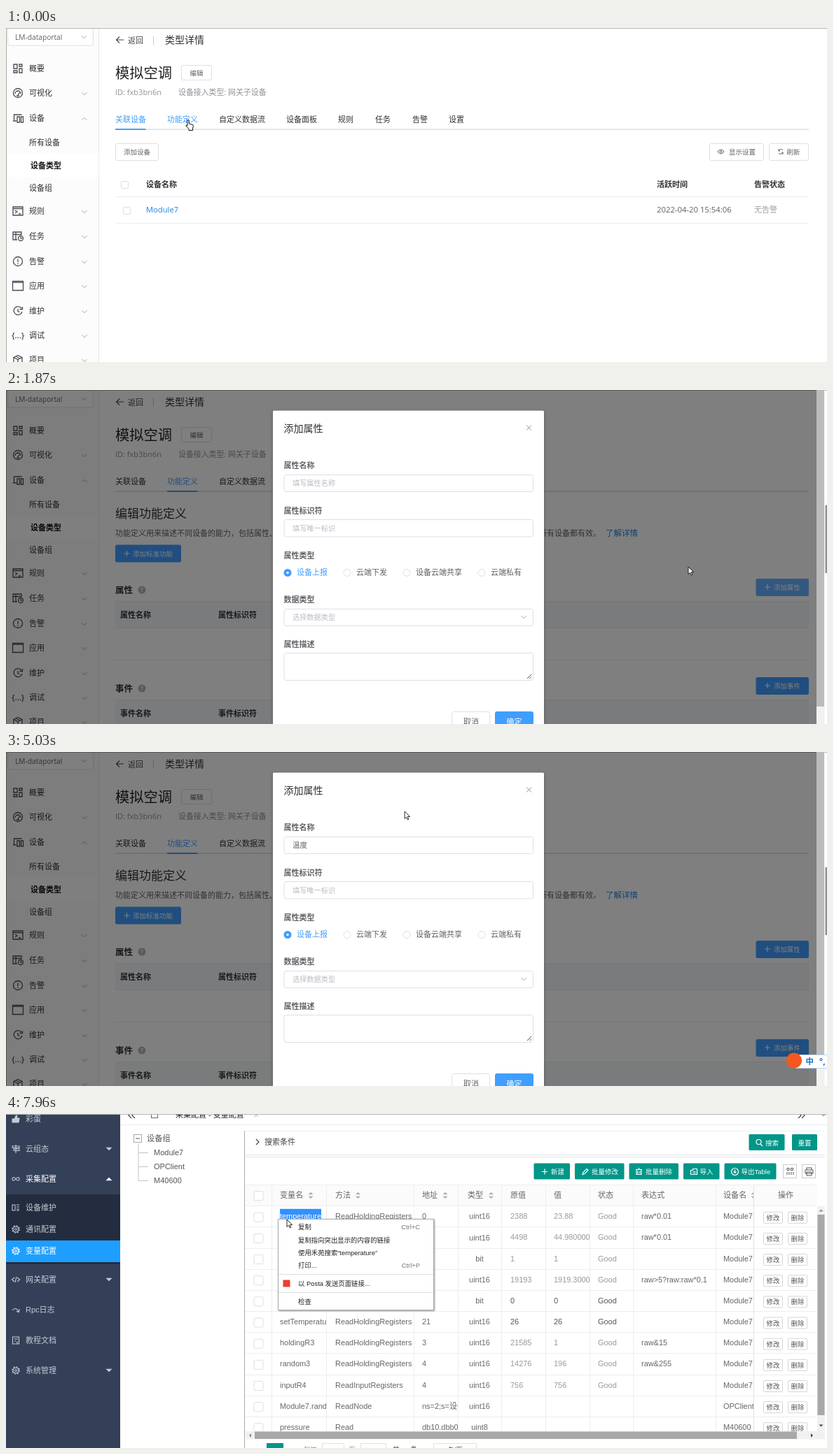
An HTML page for the animation above (8000 ms loop, 1172 px wide and 478 px high).

```html
<!DOCTYPE html>
<html lang="zh-CN">
<head>
<meta charset="utf-8">
<style>
html, body { margin: 0; width: 100%; height: 100%; overflow: hidden; background: #fff; }
svg { display: block; }
text { white-space: pre; }
#stage { width: 1172px; height: 478px; font-family: 'Open Sans', 'Noto Sans CJK SC', 'Noto Sans CJK', sans-serif; }
#monitor { font-family: 'Liberation Sans', 'Noto Sans CJK SC', 'Noto Sans CJK', sans-serif; }
</style>
</head>
<body>
<svg id="stage" viewBox="0 0 1172 478"></svg>
<script>
const LOOP = 8000;
const BLUE = '#409eff', GREEN = '#009688';
const $ = id => document.getElementById(id);

// ---- drawing helpers: each returns SVG markup ----
const esc = s => String(s).replace(/&/g, '&amp;').replace(/</g, '&lt;');
const text = (x, y, s, size = 11, fill = '#303133', more = '') =>
  `<text x="${x}" y="${y + size * 0.37}" font-size="${size}" fill="${fill}" ${more}>${esc(s)}</text>`;
const bold = (x, y, s, size, fill) => text(x, y, s, size, fill, 'font-weight="700"');
const rect = (x, y, w, h, fill, stroke = 'none', r = 0, more = '') =>
  `<rect x="${x}" y="${y}" width="${w}" height="${h}" fill="${fill}" stroke="${stroke}" rx="${r}" ${more}/>`;
const path = (d, stroke, w = 1, fill = 'none') =>
  `<path d="${d}" stroke="${stroke}" stroke-width="${w}" fill="${fill}"/>`;
const disc = (x, y, r, fill, stroke = 'none', w = 1) =>
  `<circle cx="${x}" cy="${y}" r="${r}" fill="${fill}" stroke="${stroke}" stroke-width="${w}"/>`;
const hline = (x1, x2, y, c = '#ebeef5') => path(`M${x1} ${y + .5}H${x2}`, c);
const vline = (x, y1, y2, c = '#eee') => path(`M${x + .5} ${y1}V${y2}`, c);
const at = (x, y, s) => `<g transform="translate(${x} ${y})">${s}</g>`;
const group = (id, s) => `<g id="${id}">${s}</g>`;
const clip = (x, y, w, h, s) => `<svg x="${x}" y="${y}" width="${w}" height="${h}">${s}</svg>`;
const chevron = (x, y, dir = 1, c = '#a0a4aa') =>
  path(`M${x - 3.5} ${y - 1.8 * dir}l3.5 3.5 3.5 -3.5`.replace(/3\.5 3\.5 3\.5 -3\.5/, `3.5 ${3.5 * dir} 3.5 ${-3.5 * dir}`), c);
const plus = (x, y) => path(`M${x - 4} ${y}h8M${x} ${y - 4}v8`, '#fff', 1.1);
const box = (x, y, w, h, label, tx) =>
  rect(x + .5, y + .5, w, h, '#fff', '#dcdfe6', 2.5) + text(tx, y + h / 2 + .5, label, 9.5, '#606266');

// ---- first screen: device type page ----
const icons = [
  [58, 'M-6 -6h5v6h-5zM2 -6h4v3h-4zM2 0h4v6h-4zM-6 3h5v3h-5z'],
  [93, 'M-6.5 0a6.5 6.5 0 1 0 13 0a6.5 6.5 0 1 0 -13 0M-4 1a4 4 0 0 1 8 0M0 3l2.5 -4M-2 4h4'],
  [129, 'M-2 4h-5M-5.5 3v-8h11M-1 -2h3.5v8h-3.5zM4.5 -2h3v8h-3z'],
  [262, 'M-7 -6h14v12h-14zM-7 -3.5h14M-4 -1l3 2 -3 2M1 4h3'],
  [298, 'M-1 5h-6v-11h12v4M-7 -2.5h12M-3 -6v11M0.5 3a3.5 3.5 0 1 0 7 0a3.5 3.5 0 1 0 -7 0M4 1v2h2'],
  [334, 'M-6.5 0a6.5 6.5 0 1 0 13 0a6.5 6.5 0 1 0 -13 0M0 -3.5v4.5M0 2.5v1.5'],
  [369, 'M-7.5 -6.5h15v13h-15zM-7.5 -4.8h15'],
  [405, 'M5 -4a6 6 0 1 0 1 5M6.5 -6v3.5h-4M0 -3v3.5l2.5 1'],
  [475, 'M0 -6.5l6 3v7l-6 3 -6 -3v-7zM-6 -3.5l6 3 6 -3M0 -.5v7M-3 -5l6 3']
];
const menu = [['概要', 58], ['可视化', 93], ['设备', 129], ['规则', 262], ['任务', 298],
  ['告警', 334], ['应用', 369], ['维护', 405], ['调试', 440], ['项目', 475]];

const sidebar = rect(0, 0, 132, 478, '#fcfcfc') + rect(1, 180, 131, 33, '#fff') + vline(132, 0, 478, '#e6e8eb') +
  rect(2.5, -4.5, 122, 29.5, '#fff', '#dcdfe6', 3) + text(13, 13, 'LM-dataportal', 10.2, '#606266') + chevron(111, 13) +
  icons.map(([y, d]) => at(17, y, path(d, '#4a4d52', 1.3))).join('') +
  text(8, 440, '{...}', 11.5, '#4a4d52', 'font-weight="600"') +
  menu.map(([s, y], i) => text(33, y, s) + (i ? chevron(112, y + 1, i === 2 ? -1 : 1) : '')).join('') +
  text(33, 164, '所有设备') + bold(35, 197, '设备类型', 11, '#111') + text(33, 229, '设备组');

const header = path('M168 17h-10M162 12.5l-4.5 4.5 4.5 4.5', '#444', 1.1) + text(174, 17.5, '返回', 11, '#444') +
  vline(210, 11, 24, '#ccc') + text(227, 17, '类型详情', 14) + text(156, 64, '模拟空调', 20.3, '#1f2022') +
  box(250, 53, 43, 21, '编辑', 262.5) + text(156, 92, 'ID: fxb3bn6n', 11, '#909399') +
  text(246, 92, '设备接入类型: 网关子设备', 10.9, '#909399');

const tabs = lit => hline(156, 1146, 145, '#dfe2e8') + hline(156, 1146, 144, '#e6e9ee') +
  [['关联设备', 156], ['功能定义', 230], ['自定义数据流', 304], ['设备面板', 400], ['规则', 474],
   ['任务', 527], ['告警', 580], ['设置', 632]]
    .map(([s, x], i) => text(x, 131, s, 11, lit.includes(i) ? BLUE : '#303133')).join('');

const check = (x, y, s = 10) => rect(x - s / 2 + .5, y - s / 2 + .5, s, s, '#fff', '#dcdfe6', 1.5);

const devices = tabs([0, 1]) + box(156, 165, 61, 24, '添加设备', 168) + box(1004, 165, 77, 24, '显示设置', 1032) +
  path('M1016 177q4.5 -6 9 0q-4.5 6 -9 0', '#606266') + disc(1020.5, 177, 1.4, 'none', '#606266') +
  box(1089, 165, 56, 24, '刷新', 1114.5) + path('M1103 176a3.4 3.4 0 0 1 6 -1M1109 178a3.4 3.4 0 0 1 -6 1M1103 173v3h2M1109 181v-3h-2', '#606266') +
  check(169, 224) + bold(200, 224, '设备名称') + bold(929, 224, '活跃时间') + bold(1068, 224, '告警状态') + hline(156, 1146, 241) +
  check(172, 261) + text(200, 260, 'Module7', 11.2, '#1d84e2') + text(929, 260, '2022-04-20 15:54:06', 11.3, '#606266') +
  text(1068, 260, '无告警', 11, '#a0a0a0') + hline(156, 1146, 279);

const block = (y, name, id) => bold(156, y, name, 12.5) + disc(194, y, 5.5, '#b4b6ba') +
  text(194, y, '?', 8, '#fff', 'text-anchor="middle" font-weight="700"') +
  rect(1070.5, y - 16, 75.5, 25, BLUE, 'none', 2.5, `id="${id}"`) + plus(1087, y - 4) + text(1096, y - 3.5, '添加' + name, 9.4, '#fff') +
  rect(156, y + 16, 990, 38, '#f5f7fa') + hline(156, 1146, y + 16) + hline(156, 1146, y + 54) +
  ['名称', '标识符', '类型'].map((s, i) => bold(163 + i * 140, y + 36, name + s)).join('');

const functions = tabs([1]) + text(156, 177, '编辑功能定义', 17) +
  text(156, 205, '功能定义用来描述不同设备的能力，包括属性、事件和服务三种功能类型，设备类型的功能定义完成后，将对该设备类型下的所有设备都有效。', 11, '#606266') +
  text(856, 205, '了解详情', 11.5, '#1d84e2') +
  rect(156, 221.5, 94, 25, BLUE, 'none', 2.5) + plus(172.5, 234) + text(181, 234, '添加标准功能', 9.5, '#fff') +
  block(286, '属性', 'addProp') + bold(583, 322, '数据类型') +
  text(651, 363, '暂无数据', 11, '#909399', 'text-anchor="middle"') + hline(156, 1146, 386) + block(427, '事件', 'addEvent') +
  rect(1169.5, 165, 3, 97, '#8d9095');

// ---- dialog ----
const field = (y, h, more = '') => rect(397, y + .5, 355.5, h, '#fff', '#dcdfe6', 3, more);
const hint = (y, s, more) => text(409, y, s, 10.2, '#b8bcc4', more);
const dialog = rect(381, 29.5, 387, 470, '#fff', 'none', 1.5, 'style="filter:drop-shadow(0 1px 2px rgba(0,0,0,.3))"') +
  text(396.5, 55, '添加属性', 14) + path('M743 50.500l7 7M750 50.500l-7 7', '#909399') +
  [['属性名称', 108], ['属性标识符', 172.5], ['属性类型', 237], ['数据类型', 300], ['属性描述', 364]]
    .map(([s, y]) => bold(396.5, y, s, 11, '#606266')).join('') +
  field(121, 24, 'id="nameBox"') + hint(133, '填写属性名称', 'id="nameHint"') + text(409, 133, '', 10.5, '#606266', 'id="nameText"') +
  field(185, 24.5) + hint(198, '填写唯一标识') + field(313, 24) + hint(325, '选择数据类型') + chevron(739, 325) +
  field(376, 39) + path('M744 413l6 -6M747.5 413l2.500 -2.500', '#555') +
  [['设备上报', 402], ['云端下发', 487], ['设备云端共享', 572], ['云端私有', 679]].map(([s, x], i) =>
    disc(x, 261.5, i ? 5 : 5.5, i ? '#fff' : BLUE, i ? '#dcdfe6' : 'none') + (i ? '' : disc(x, 261.5, 1.7, '#fff')) +
    text(x + 13, 261, s, 11, i ? '#606266' : BLUE)).join('') +
  rect(636.5, 460.5, 54, 28, '#fff', '#dcdfe6', 3) + text(653, 475, '取消', 11, '#606266') +
  rect(698, 460, 55, 28, BLUE, 'none', 3) + text(714.5, 475, '确定', 11, '#fff');

const scrollbar = rect(1157, 0, 11.5, 478, '#f1f1f1') + rect(1157, 0, 11, 453, '#bcbcbc');

const suggestions = rect(397, 154.5, 355, 206, '#fff', '#e4e7ed', 3, 'style="filter:drop-shadow(0 1px 4px rgba(0,0,0,.16))"') +
  clip(397, 155, 355, 204, [['电压', 'U'], ['电流', 'I'], ['瞬时总有功功率', 'P'], ['瞬时总无功功率', 'Q'], ['瞬时总视在功率', 'S']]
    .map(([s, k], i) => text(15.5, 21 + 45.6 * i, s, 11, '#606266') + text(15.5, 38.5 + 45.6 * i, k, 9.5, '#909399') +
      text(339, 21 + 45.6 * i, '智能单相电表', 9.4, '#a0a2a6', 'text-anchor="end"')).join(''));

const imeBar = rect(1126.5, 433.5, 60, 19, '#fff', '#b9d4ec', 2) + disc(1125, 441.5, 11, '#f4581f') +
  bold(1141.5, 443, '中', 11.5, '#1570d8') + bold(1161, 443, '°,', 12, '#1570d8');

const words = { w: '我 为 无 万 位', we: '我 为 未 位 问', wen: '问 文 稳 吻 Welka', wend: '温度 问的 稳定 文档', wendu: '温度 稳度 温' };
function candidates(key) {
  let x = 419, s = rect(409.5, 140.5, 246.5, 42, '#fff', '#7fb2de', 1) + disc(647, 151, 8, '#fbd9c8');
  s += text(418, 150, key, 12.5, '#0a6cd6');
  words[key].split(' ').forEach((w, i) => {
    const c = i ? '#0a6cd6' : '#e8402a', latin = /\w/.test(w);
    s += text(x, 169.5, i + 1, 9.5, c) + text(x + 8.5, 169.5, w, 13.2, c);
    x += 20 + (latin ? 44 : 13.2 * w.length);
  });
  return s + path('M623 168l-2.500 3 2.500 3', '#bbb') + path('M632 168l3 3 -3 3', '#0a6cd6', 1.3);
}

const page = rect(0, 0, 1172, 478, '#fff') + sidebar + header + group('devices', devices) + group('functions', functions) +
  rect(156, 144, 43.5, 2, BLUE, 'none', 0, 'id="tabBar"') + hline(0, 1172, 0, '#b5b5b5') + vline(0, 0, 478, '#a5a5a5') +
  rect(0, 0, 1157, 478, '#000', 'none', 0, 'id="mask"') + group('dialog', scrollbar + dialog) + group('suggestions', suggestions) +
  group('imeBar', imeBar) + group('candidates', '') + group('caret', rect(0, 0, 1, 11, '#333'));

// ---- second screen: variable table ----
const NAV = '#c5cad3';
const navIcons = [
  [7, 'M-5 0h2.500v5h-2.500zM-2 0l2.500 -5q2 0 1 4h3.500l-1 6h-6z', 1], [50, 'M-5 -4h10v2.500h-10zM-3 0h8v2.500h-8zM0 -6v12'],
  [93, 'M0 0c-2 -3 -5 -3 -5 0s3 3 5 0s5 -3 5 0s-3 3 -5 0'], [134, 'M-5 -4h4v8h-4zM1 -4h4M1 -1h4M1 2h4M1 4h4'],
  [237, 'M-2 -3l-3.500 3 3.500 3M2 -3l3.500 3 -3.500 3M1 -4l-2 8'], [280, 'M-5 1q5 -6 9 2M5 -1l-.500 4.500 -4 -1'],
  [324, 'M-4.500 -5h9v10h-9zM-2 -2h5M-2 1h2M2 1v4']
];
const gear = (y, c) => at(14, y, disc(0, 0, 4, 'none', c, 1.2) + disc(0, 0, 1.5, 'none', c) +
  `<circle r="5.200" fill="none" stroke="${c}" stroke-width="1.300" stroke-dasharray="2 2.080"/>`);
const triangle = (x, y, d, c, w = 4.5) => path(`M${x - w} ${y - w * d / 2}h${2 * w}l${-w} ${w * d}z`, 'none', 0, c);
const nav = rect(0, 0, 163, 478, '#344058') + rect(0, 115, 163, 100, '#232d3f') + rect(0, 181, 163, 31, '#1e9fff') +
  navIcons.map(([y, d, solid]) => at(14, y, path(d, NAV, 1.1, solid ? NAV : 'none'))).join('') +
  gear(165, NAV) + gear(196, '#fff') + gear(367, NAV) +
  [['彩蛋', 7], ['云组态', 50], ['采集配置', 93], ['设备维护', 134], ['通讯配置', 165], ['变量配置', 196],
   ['网关配置', 237], ['Rpc日志', 280], ['教程文档', 324], ['系统管理', 367]]
    .map(([s, y]) => text(28, y, s, 11, y === 93 || y === 196 ? '#fff' : NAV)).join('') +
  [50, 237, 367].map(y => triangle(147, y, 1, NAV)).join('') + triangle(147, 93, -1, '#fff');

const tree = path('M179 -2l-4 4 4 4M184 -2l-4 4 4 4M1131 6l4 -4 -4 -4M1136 6l4 -4 -4 -4', '#444', 1.1) + rect(207.5, -4.5, 9, 10, 'none', '#666') +
  text(242, 1, '采集配置 - 变量配置', 11, '#222') + path('M354 -1l6 5M360 -1l-6 5', '#aaa') + chevron(1167, 1, 1, '#555') + hline(163, 1172, 15) +
  rect(182.5, 29.5, 11, 11, '#fff', '#aaa') + path('M185 35h6', '#555') + text(201, 35, '设备组', 11.2, '#555') +
  path('M189 42V96M189 55.500h14M189 75.500h14M189 95.500h14', '#c4c4c4') +
  ['Module7', 'OPClient', 'M40600'].map((s, i) => text(211, 55 + 20 * i, s, 11, '#555')).join('') + vline(340, 24, 478, '#a8a8a8');

const button = (x, y, w, s, tx, icon = '') =>
  rect(x, y, w, 23, GREEN, 'none', 1.5) + text(tx, y + 12, s, 9.5, '#fff') + (icon && at(tx - 9, y + 12, path(icon, '#fff', 1.2)));
const toolbar = hline(342, 1169, 24) + hline(342, 1169, 57) + rect(342, 58, 827, 4, '#f6f6f6') + hline(342, 1169, 62) +
  path('M357 36l4 4 -4 4', '#444', 1.2) + text(369, 40, '搜索条件', 11, '#444') +
  button(1060.5, 29, 51, '搜索', 1084, 'M-4 -1a3.500 3.500 0 1 0 7 0a3.500 3.500 0 1 0 -7 0M2 2l3 3') + button(1122, 29, 36, '重置', 1130.500) +
  button(753.5, 70.5, 51.5, '新建', 778, 'M-4 0h8M0 -4v8') + button(812, 70.5, 70.5, '批量修改', 836, 'M-4 4l1 -3 5 -5 2 2 -5 5z') +
  button(889.5, 70.5, 70.5, '批量删除', 913, 'M-5 -3h9M-4 -3v7h7v-7M-2 -4.500h3M-2 -1v4M1 -1v4') +
  button(967, 70.5, 51.5, '导入', 990.500, 'M-4 4v-6h3v-2h6v8zM-1 0h4M-1 2h4') +
  button(1025.5, 70.5, 74, '导出Table', 1049.500, 'M-5 0a5 5 0 1 0 10 0a5 5 0 1 0 -10 0M0 -3v5M-2 0l2 2 2 -2') +
  rect(1109.5, 72.5, 19, 19, '#fff', '#ccc') + path('M1115 77.500h3v3h-3zM1120.500 77.500h3v3h-3zM1115 83v4M1118 83v4M1121 83v4M1124 83v4', '#555') +
  rect(1136.5, 72.5, 19, 19, '#fff', '#ccc') + path('M1143 80v-3h7v3M1141 80h11v5h-11zM1143 83h7v5h-7z', '#555');

const rowY = i => 146.3 + 30.15 * i;
const cellText = (x, right, y, s, c = '#666') => clip(x, y - 15, right - x, 30, text(0, 15, s, 10.95, c));
const sorter = x => triangle(x, 113.5, -1, '#b2b2b2', 3.6) + triangle(x, 119.5, 1, '#b2b2b2', 3.6);
const rows = [
  'temperature ReadHoldingRegisters 0 uint16 raw*0.01', 'humidity ReadHoldingRegisters 1 uint16 raw*0.01', 'coil1 ReadCoil 1 bit',
  'random ReadHoldingRegisters 2 uint16 raw>5?raw:raw*0.1', 'input2 ReadInput 2 bit', 'setTemperature ReadHoldingRegisters 21 uint16',
  'holdingR3 ReadHoldingRegisters 3 uint16 raw&15', 'random3 ReadHoldingRegisters 4 uint16 raw&255', 'inputR4 ReadInputRegisters 4 uint16',
  'Module7.random ReadNode ns=2;s=设备 uint16', 'pressure Read db10.dbb0 uint8'].map(s => s.split(' '));
const small = (x, y, s) => rect(x + .5, y - 7.5, 27, 16, '#fff', '#d5d5d5', 1) + text(x + 14, y + .5, s, 9.4, '#555', 'text-anchor="middle"');

const grid = rect(342, 101, 816, 30, '#fbfbfb') + hline(342, 1157, 101) +
  [379, 457, 582, 645, 707, 770, 833, 895, 1013].map(x => vline(x, 102, 454)).join('') + check(360, 116.5, 13) +
  [['变量名', 391], ['方法', 470], ['地址', 594], ['类型', 659], ['原值', 720], ['值', 782], ['状态', 845], ['表达式', 907], ['设备名', 1024]]
    .map(([s, x]) => text(x, 116, s, 11.1, '#666')).join('') +
  [435, 502.5, 627, 692.5, 1067].map(sorter).join('') +
  rows.map(([name, method, addr, type, expr], i) => {
    const y = rowY(i), dev = i < 9 ? 'Module7' : i < 10 ? 'OPClient' : 'M40600';
    return hline(342, 1157, Math.round(y - 15)) + check(360, y + 1, 13) + cellText(391, 457, y, name) + cellText(470, 582, y, method) +
      cellText(594, 645, y, addr) + text(676, y, type, 10.95, '#666', 'text-anchor="middle"') +
      cellText(907, 1013, y, expr || '') + cellText(1024, 1068, y, dev);
  }).join('') +
  rect(1068, 102, 89, 352, '#fff') + rect(1068, 102, 89, 29, '#fbfbfb') + vline(1067, 102, 454, '#e2e2e2') + text(1113, 116, '操作', 11.1, '#666', 'text-anchor="middle"') +
  rows.map((_, i) => hline(1068, 1157, Math.round(rowY(i) - 15)) + small(1081, rowY(i) + 1.5, '修改') + small(1116, rowY(i) + 1.5, '删除')).join('');

const frame = rect(1158, 132, 11, 322, '#f1f1f1') + rect(1158.5, 144, 10, 287, '#a8a8a8') + triangle(1163.5, 138, -1, '#888', 3) + triangle(1163.5, 446, 1, '#444', 3) +
  rect(342, 454, 827, 24, '#fff') + rect(342, 454, 827, 11.5, '#f1f1f1') + rect(355, 454.5, 774, 10.5, '#a8a8a8') +
  path('M350 457l-3 3 3 3z', 'none', 0, '#888') + path('M1149 457l3 3 -3 3z', 'none', 0, '#444') +
  rect(372, 471, 24, 10, GREEN) + text(356, 482, '<', 10, '#bbb') + text(406, 482, '>', 10, '#bbb') + text(425, 480, '到第', 9.5, '#888') +
  rect(451.5, 471.5, 31, 20, '#fff', '#e2e2e2') + text(489, 480, '页', 9.5, '#888') + rect(506.5, 471.5, 36, 20, '#fff', '#e2e2e2') +
  text(552, 480, '共 11 条', 9.8, '#444') + rect(610.5, 471.5, 61, 20, '#fff', '#e2e2e2') + text(617, 480, '20 条/页', 9.5, '#444');

// Readings as raw/value per row, with the time each set arrives.
const readings = [
  [5610, '2424/24.2400000 5808/58.08 1/1 6789/678.900000 0/0 26/26 3881/9 3576/248 4490/4490'],
  [6940, '2335/23.35 5751/57.51 0/0 7392/739.2 1/1 26/26 14376/8 6262/118 10994/10994'],
  [7960, '2388/23.88 4498/44.9800000 1/1 19193/1919.300000 0/0 26/26 21585/1 14276/196 756/756']
].map(([t, s]) => [t, s.split(' ')]);
function values(t) {
  const n = readings.findLastIndex(r => t >= r[0]);
  const [start, now] = readings[n];
  return now.map((v, i) => {
    const changed = n ? v !== readings[n - 1][1][i] && i !== 4 : i === 2;
    const c = t === start && changed ? (n ? '#999' : '#c8c8c8') : '#555', y = rowY(i);
    const [raw, val] = v.split('/');
    return cellText(720, 770, y, raw, c) + cellText(782, 833, y, val, c) + cellText(845, 895, y, 'Good', c);
  }).join('');
}
const picked = (i, w) => rect(391, rowY(i) - 10.5, w, 21, '#3390ff') + cellText(391, 457, rowY(i), rows[i][0], '#fff');

// items: [y, label, shortcut, icon]; an item with only y is a divider
const popup = (x, y, w, h, tx, key, items) =>
  rect(x + .5, y + .5, w, h, '#fff', '#a9a9a9', 0, 'style="filter:drop-shadow(1.5px 1.5px 1px rgba(0,0,0,.4))"') +
  items.map(([iy, s, k, icon]) => !s ? hline(x + 1, x + w, iy, '#dedede') :
    text(tx, iy, s, 9.4, s === '前进' ? '#888' : '#222') + (k ? text(key, iy, k, 9.4, '#777', 'text-anchor="end"') : '') +
    (icon ? at(tx - 16, iy, icon) : '')).join('');
const mailMark = rect(-5.5, -5, 10, 10, '#e8402f');
const mailItem = '以 Posta 发送页面链接...';
const pageMenu = popup(421, 141, 214, 264, 450, 615, [
  [153, '返回', 'Alt+向左箭头'], [171, '前进', 'Alt+向右箭头'], [189, '重新加载', 'Ctrl+R'], [202], [215, '另存为...', 'Ctrl+S'],
  [233, '打印...', 'Ctrl+P'], [251, '投射...'], [264], [277, '发送到您的设备', '', path('M0 3h-5M-4 2v-6h9v2M1 -1h4v5h-4z', '#444')],
  [296, '为此页面创建二维码', '', path('M-5 -5h4v4h-4zM1 -5h4v4h-4zM-5 1h4v4h-4zM1 1h4v4h-4z', '#444', 1.3)], [309],
  [323, '翻成中文（简体）'], [336], [349.5, mailItem, '', mailMark], [362], [376, '查看网页源代码', 'Ctrl+U'], [394, '检查']]);
const textMenu = popup(388, 150, 222, 130, 417, 591, [
  [162, '复制', 'Ctrl+C'], [181, '复制指向突出显示的内容的链接'], [199, '使用禾苑搜索“temperature”'], [217, '打印...', 'Ctrl+P'], [229],
  [242.5, mailItem, '', mailMark], [255], [269, '检查']]);

const monitor = rect(0, 0, 1172, 478, '#fff') + nav + tree + toolbar + grid + group('values', '') + group('pickOld', picked(5, 66)) +
  group('pickNew', picked(0, 59)) + frame + hline(0, 1172, 0, '#b5b5b5') + group('pageMenu', pageMenu) + group('textMenu', textMenu);

const arrow = path('M0 0V10.500L2.500 8.300 4.200 12 5.900 11.300 4.200 7.600H7.600Z', '#111', .9, '#fff');
const hand = path('M-1 0q1.300 -1.200 2.300 0v5l4.700 1.200q1.500 .5 1.300 2.300l-.8 3.500v2.500h-5.500v-2l-4 -4.500q-.3 -1.800 1.600 -.8l.4 .6z', '#111', 1, '#fff');

$('stage').innerHTML = group('page', page) + group('monitor', monitor) + group('arrow', arrow) + group('hand', hand);

// ---- time ----
// The screen refreshes only at these moments.
const ticks = [0, 130, 280, 420, 560, 710, 850, 1000, 1140, 1290, 1440, 1580, 1720, 1870, 2000, 2150, 2300,
  2460, 2610, 2750, 2900, 3040, 3480, 3610, 3740, 3890, 4040, 4320, 4460, 4610, 4750, 4890, 5040, 5180,
  5610, 5760, 5900, 6050, 6200, 6350, 6500, 6800, 6940, 7080, 7230, 7380, 7530, 7810, 7960];
const track = [[0, 260, 132], [130, 260, 132], [1290, 1093, 279], [1720, 1093, 272], [1870, 974, 253], [2460, 520, 136],
  [2610, 483, 132], [4320, 483, 132], [5180, 600, 68], [5760, 455, 296], [6500, 421, 141], [6800, 421, 141], [7080, 390, 150],
  [7530, 390, 149], [7810, 389, 150], [7960, 401, 151]];
const ramp = (t, a, b) => { const k = Math.min(1, Math.max(0, (t - a) / (b - a))); return k * k * (3 - 2 * k); };
function pointer(t) {
  const i = Math.min(track.length - 2, track.findLastIndex(p => t >= p[0]));
  const [a, x, y] = track[i], [b, u, v] = track[i + 1], k = ramp(t, a, b);
  return [x + (u - x) * k, y + (v - y) * k];
}
const show = (id, on) => $(id).style.display = on ? '' : 'none';
const within = (t, a, b) => t >= a && t < b;

function renderPage(t) {
  show('devices', t < 130);
  show('functions', t >= 130);
  $('tabBar').setAttribute('x', 156 + 74 * ramp(t, 0, 420) * (t >= 130));
  $('addProp').setAttribute('fill', within(t, 1580, 1870) ? '#3a8ee6' : within(t, 1290, 2460) ? '#66b1ff' : BLUE);

  const open = ramp(t, 1440, 1720);
  show('dialog', open > 0);
  $('dialog').style.opacity = open;
  $('dialog').setAttribute('transform', `translate(0 ${-16 * (1 - open)})`);
  $('mask').style.opacity = .5 * ramp(t, 1720, 1870);

  const focus = within(t, 2610, 4890), composing = within(t, 3480, 4320);
  const key = composing ? 'wendu'.slice(0, ticks.indexOf(t) - ticks.indexOf(3480) + 1) : '';
  const typed = t >= 4320 ? '温度' : key;
  $('nameBox').setAttribute('stroke', focus ? BLUE : within(t, 2460, 2610) ? '#c0c4cc' : '#dcdfe6');
  show('nameHint', !typed);
  $('nameText').textContent = typed;
  show('suggestions', within(t, 2750, 4460));
  show('imeBar', within(t, 2610, 5040));
  $('candidates').innerHTML = key ? candidates(key) : '';
  show('caret', focus && (composing || t % 1000 < 800));
  if (focus) {
    const w = $('nameText').getComputedTextLength();
    $('caret').setAttribute('transform', `translate(${Math.round(409 + w)} 127.5)`);
    if (key) $('candidates').innerHTML += rect(441 + (key.length - 3) * 7.2, 143, 1, 13, '#e8402a');
  }
}
function renderMonitor(t) {
  $('values').innerHTML = values(t);
  show('pickOld', t < 6800);
  show('pickNew', t >= 7380);
  show('pageMenu', within(t, 6800, 7230));
  show('textMenu', t >= 7810);
}

let last = -1;
function render(ms) {
  const t = ticks.findLast(k => ms >= k);
  if (t === last) return;
  last = t;
  const first = t < 5610;
  show('page', first);
  show('monitor', !first);
  first ? renderPage(t) : renderMonitor(t);
  const [x, y] = pointer(t), isHand = t < 280 || within(t, 2610, 4460);
  for (const id of ['arrow', 'hand']) $(id).setAttribute('transform', `translate(${x} ${y})`);
  show('hand', isHand);
  show('arrow', !isHand && t !== 5610);
}
const begin = performance.now();
function loop() {
  render((performance.now() - begin) % LOOP);
  requestAnimationFrame(loop);
}
loop();
</script>
</body>
</html>
```
